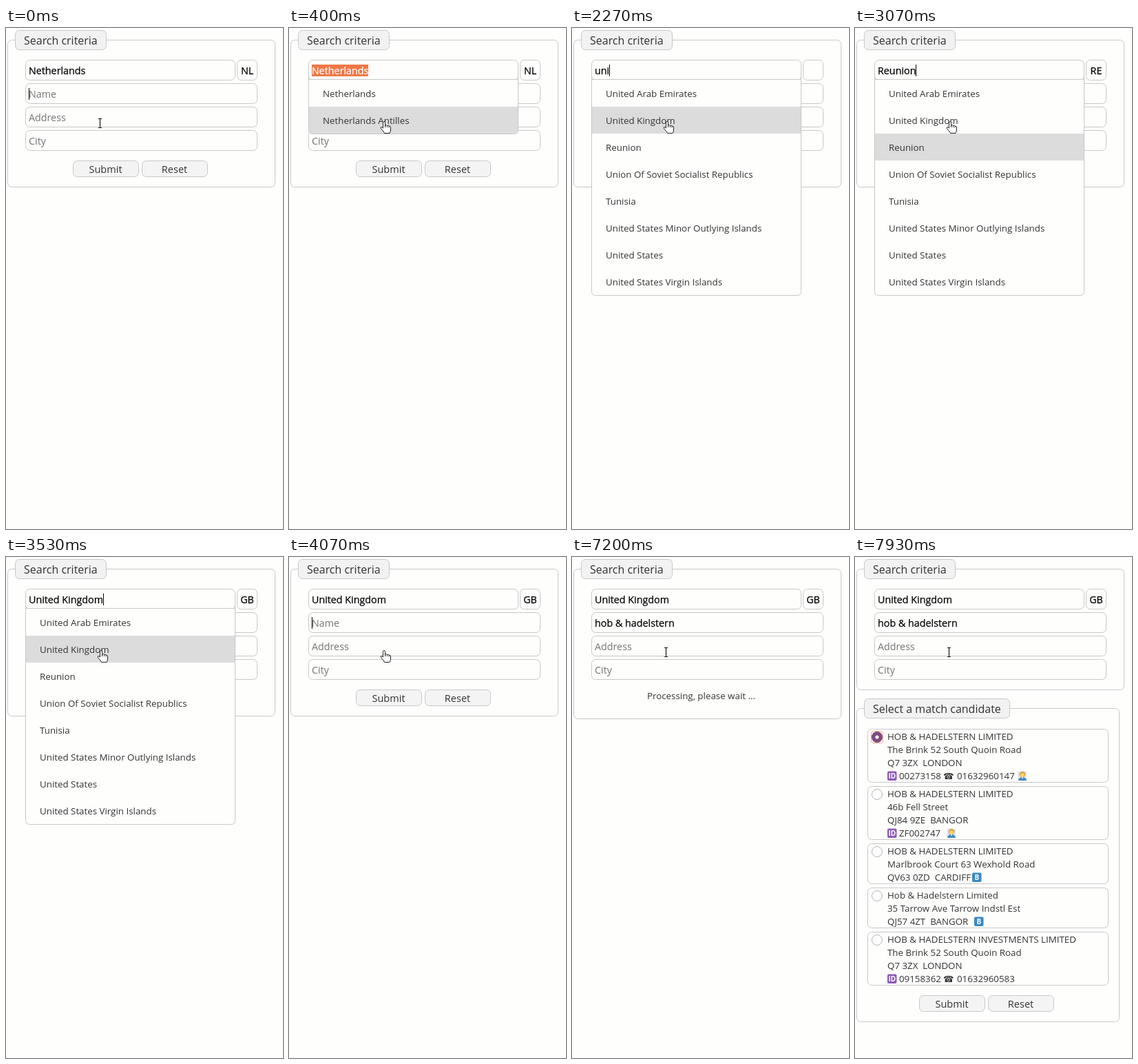
An HTML page that plays this animation: 402x726 px, repeating every 8 s.

```html
<!DOCTYPE html>
<html lang="en">
<head>
<meta charset="utf-8">
<title>Search form</title>
<style>
html, body { margin: 0; width: 100%; height: 100%; overflow: hidden; background: #fefefd; }
svg { display: block; width: 402px; height: 726px; }
text { font: 13.33px "Open Sans", sans-serif; fill: #333; white-space: pre; }
.legend { font-size: 16px; }
.field { font-size: 14.3px; fill: #000; stroke: #000; stroke-width: .25px; }
.hint { font-size: 14.3px; fill: #757575; }
.btn { font-size: 14.5px; }
.picked { fill: #fff; stroke: #fff; }
.badge { font-weight: 700; font-size: 10px; fill: #fff; }
.phone { font: 12.5px "DejaVu Sans", sans-serif; }
.mid { text-anchor: middle; }
</style>
</head>
<body>
<svg id="stage" viewBox="0 0 402 726" xmlns="http://www.w3.org/2000/svg"></svg>
<script>
const LOOP = 8000;
const LINE = '#c8c8c8', PAPER = '#fefefd', SOFT = '#f4f4f4', HOVER = '#dcdcdc';
const stage = document.getElementById('stage');

const dutch = ['Netherlands', 'Netherlands Antilles'];
const united = ['United Arab Emirates', 'United Kingdom', 'Reunion',
  'Union Of Soviet Socialist Republics', 'Tunisia',
  'United States Minor Outlying Islands', 'United States', 'United States Virgin Islands'];

const company = 'HOB & HADELSTERN LIMITED';
const matches = [
  { y: 249, lines: [company, 'The Brink 52 South Quoin Road', 'Q7 3ZX  LONDON'],
    id: '00273158', phone: '01632960147', person: 236, on: true },
  { y: 332, lines: [company, '46b Fell Street', 'QJ84 9ZE  BANGOR'],
    id: 'ZF002747', person: 133 },
  { y: 415, lines: [company, 'Marlbrook Court 63 Wexhold Road', 'QV63 0ZD  CARDIFF'], branch: 170 },
  { y: 479, lines: ['Hob & Hadelstern Limited', '35 Tarrow Ave Tarrow Indstl Est', 'QJ57 4ZT  BANGOR'], branch: 173 },
  { y: 543, lines: ['HOB & HADELSTERN INVESTMENTS LIMITED', 'The Brink 52 South Quoin Road', 'Q7 3ZX  LONDON'],
    id: '09158362', phone: '01632960583' }
];

// Each step changes part of the state from its time on.
const steps = [
  [0, { country: 'Netherlands', code: 'NL', name: '', caret: 'name', list: null, hot: 1,
        hand: false, picked: false, button: SOFT, phase: 'form' }],
  [400, { caret: '', list: dutch, hand: true, picked: true }],
  [1730, { country: 'u', code: '', caret: 'country', list: null, hand: false, picked: false }],
  [2000, { country: 'un' }],
  [2200, { country: 'uni' }],
  [2270, { list: united, hand: true }],
  [3070, { country: 'Reunion', code: 'RE', hot: 2 }],
  [3530, { country: 'United Kingdom', code: 'GB', hot: 1 }],
  [4000, { list: null }],
  [4070, { caret: 'name' }],
  [4130, { hand: false }],
  [5330, { name: 'hob & hadelstern' }],
  [5930, { caret: 'address' }],
  [6200, { caret: 'city' }],
  [6670, { caret: '', button: '#e6e6e6' }],
  [7130, { button: HOVER }],
  [7200, { phase: 'wait', button: SOFT }],
  [7930, { phase: 'results' }]
];

const esc = s => s.replace(/&/g, '&amp;');
const text = (x, y, s, cls = '') => `<text x="${x}" y="${y}" class="${cls}">${esc(s)}</text>`;
const fill = (x, y, w, h, color, r = 0) =>
  `<rect x="${x}" y="${y}" width="${w}" height="${h}" rx="${r}" fill="${color}"/>`;
// Crisp outlined box from its outer left, top, right and bottom pixel.
const box = (l, t, r, b, color = PAPER, rad = 6) =>
  `<rect x="${l + .5}" y="${t + .5}" width="${r - l}" height="${b - t}" rx="${rad}" fill="${color}" stroke="${LINE}"/>`;

const measure = (() => {
  const ctx = document.createElement('canvas').getContext('2d');
  return s => {
    ctx.font = '14.3px "Open Sans", sans-serif';
    return ctx.measureText(s).width;
  };
})();

function group(top, right, bottom, title, edge) {
  return box(2, top, right, bottom) + box(13, top - 14, edge, top + 14, '#f2f2f2') +
    text(26, top + 7, title, 'legend');
}

function buttons(x, y, color) {
  return box(x, y, x + 95, y + 23, color) + text(x + 47.5, y + 18, 'Submit', 'btn mid') +
    box(x + 100, y, x + 195, y + 23, SOFT) + text(x + 147.5, y + 18, 'Reset', 'btn mid');
}

function field(top, right, value, hint) {
  return box(28, top, right, top + 29) + text(33, top + 21, value || hint, value ? 'field' : 'hint');
}

function caret(s) {
  const tops = { country: 46, name: 80, address: 114, city: 148 };
  if (!(s.caret in tops)) return '';
  const x = 33 + Math.round(measure(s[s.caret] || ''));
  return fill(x, tops[s.caret] + 7, 1, 17, '#000');
}

function dropdown(s) {
  if (!s.list) return '';
  const end = 75.5 + s.list.length * 39;
  let out = `<path d="M28.5 74.5H332.5V${end - 6}q0 6 -6 6H34.5q-6 0 -6 -6Z" fill="${PAPER}" stroke="${LINE}"/>` +
    `<path d="M28.5 66V75M332.5 66V75" stroke="${LINE}"/>`;
  s.list.forEach((item, i) => {
    const y = 75 + i * 39;
    if (i === s.hot) out += fill(29, y, 303, 39, HOVER);
    out += text(49, y + 25, item);
  });
  return out;
}

function badge(x, y, s, color) {
  return fill(x, y, 13.5, 13.5, color, 2) + text(x + 6.75, y + 10.4, s, 'badge mid');
}

function person(x, y) {
  return `<g transform="translate(${x} ${y})">` + fill(0, 0, 13, 13, '#dfe7ee', 1) +
    '<path d="M1 13.5q1 -5 6 -5t6 5Z" fill="#4289c1"/>' +
    '<circle cx="7" cy="4.6" r="4.2" fill="#d9953a"/>' +
    '<circle cx="7" cy="5.6" r="3" fill="#fbd668"/>' +
    '<path d="M6 8.5h2l-1 3Z" fill="#fff"/></g>';
}

function radio(y, on) {
  if (!on) return `<circle cx="32" cy="${y}" r="7.5" fill="#fefefe" stroke="#b5b5b5"/>`;
  return `<rect x="23.5" y="${y - 8.5}" width="17" height="17" rx="3" fill="none" stroke="#eba583"/>` +
    `<circle cx="32" cy="${y}" r="8" fill="#7f4a82"/><circle cx="32" cy="${y}" r="2.6" fill="#fff"/>`;
}

function match(m) {
  const rows = m.lines.length + (m.id ? 1 : 0);
  const base = m.y + 73;
  let out = box(18, m.y, 367, m.y + rows * 19 + 1) + radio(m.y + 12, m.on);
  m.lines.forEach((line, i) => out += text(47, m.y + 16 + i * 19, line));
  if (m.id) out += badge(47, base - 11.5, 'ID', '#8e5bb8') + text(64, base, m.id);
  if (m.phone) out += text(128, base, '\u260E', 'phone') + text(148, base, m.phone);
  if (m.person) out += person(m.person, base - 11.5);
  if (m.branch) out += badge(m.branch, m.y + 42.5, 'B', '#3b88c3');
  return out;
}

function pointer(hand) {
  if (hand) {
    return '<path d="M136.5 144V137.5q0 -2 1.5 -2t1.5 2V141q2.2 -1 2.8 .5q2.2 -.8 2.7 .7q2.5 -.6 2.5 1.8V148' +
      'q0 2 -1.5 4.5H138.5q-1 -2.5 -3.5 -5q-2.5 -2.5 -1.5 -3.8q1.2 -1 3 1.3Z" fill="#fff" stroke="#222" stroke-linejoin="round"/>' +
      '<path d="M139.5 141v3M142.3 142v2M145 142.5v2" stroke="#222" fill="none"/>';
  }
  const d = 'M134 131.5H136L136.5 132L137 131.5H139M136.5 132V144M134 144.5H136L136.5 144L137 144.5H139';
  return `<path d="${d}" fill="none" stroke="#fff" stroke-width="3"/><path d="${d}" fill="none" stroke="#111" stroke-width="1.2"/>`;
}

function draw(s) {
  const bottom = { form: 230, wait: 234, results: 192 }[s.phase];
  let out = fill(0, 0, 402, 726, PAPER) + group(17, 390, bottom, 'Search criteria', 145);
  out += field(46, 332, s.picked ? '' : s.country, '');
  if (s.picked) {
    out += fill(33, 53, Math.round(measure(s.country)), 17, '#f07746') + text(33, 67, s.country, 'field picked');
  }
  out += box(335, 46, 364, 75) + text(350, 67, s.code, 'field mid');
  out += field(80, 364, s.name, 'Name') + field(114, 364, '', 'Address') + field(148, 364, '', 'City');
  if (s.phase === 'form') out += buttons(97, 192, s.button);
  if (s.phase === 'wait') out += text(109, 206, 'Processing, please wait ...');
  if (s.phase === 'results') {
    out += group(219, 383, 673, 'Select a match candidate', 224) +
      matches.map(match).join('') + buttons(93, 635, SOFT);
  }
  stage.innerHTML = out + dropdown(s) + caret(s) + pointer(s.hand);
}

let shown = -1;
const start = performance.now();

function tick() {
  const t = (performance.now() - start) % LOOP;
  const past = steps.filter(step => step[0] <= t);
  if (past.length !== shown) {
    shown = past.length;
    draw(Object.assign({}, ...past.map(step => step[1])));
  }
  requestAnimationFrame(tick);
}
tick();
</script>
</body>
</html>
```
